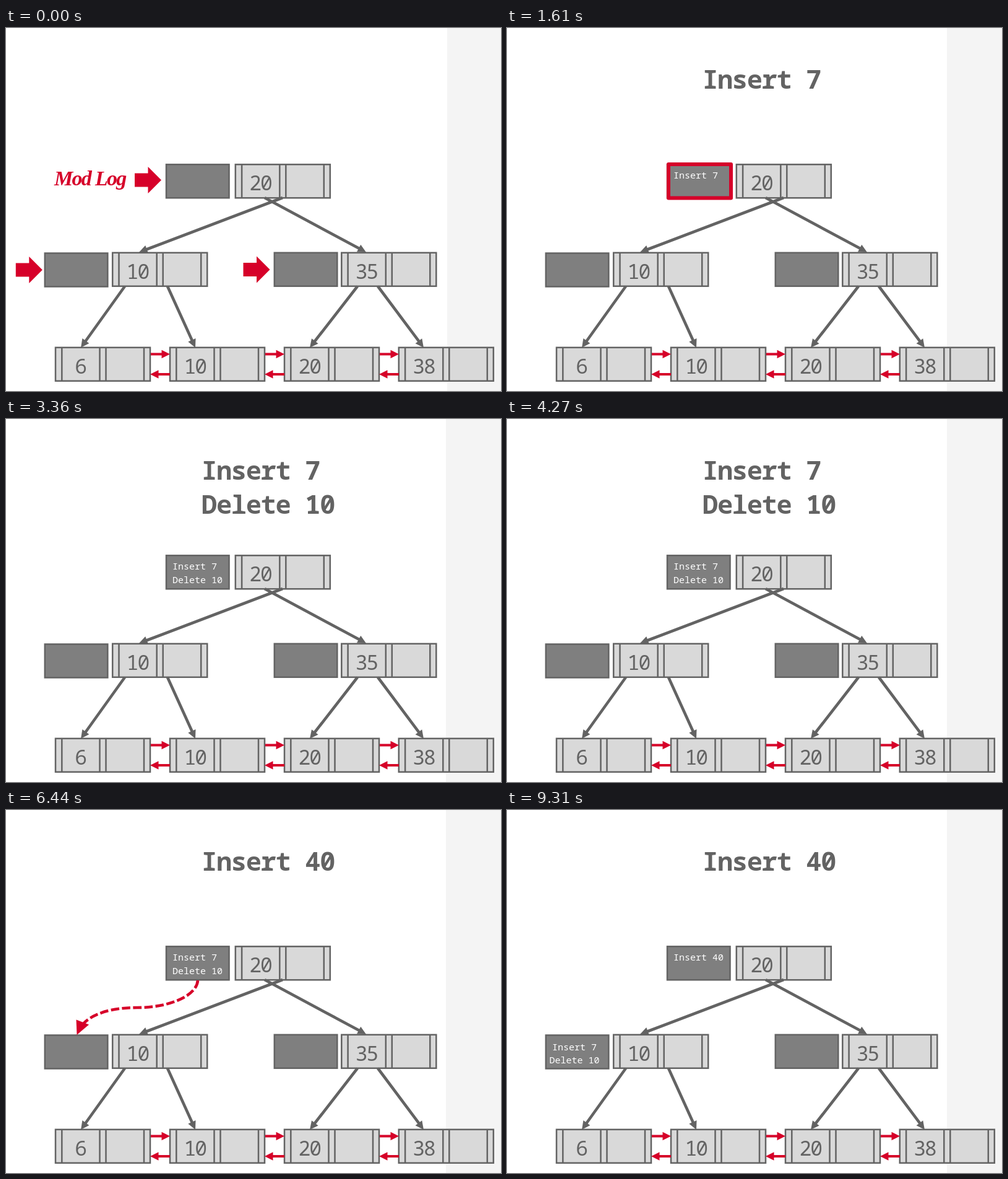
An HTML page that plays this animation: 800 px wide and 586 px high, repeating every 9.38 s.

```html
<!DOCTYPE html>
<html>
<head>
<meta charset="utf-8">
<style>
html, body { margin: 0; width: 100%; height: 100%; overflow: hidden; background: #fff; }
svg { display: block; }
text { font-family: "Noto Sans Mono", "DejaVu Sans Mono", monospace; white-space: pre; }
.title { font-size: 42px; font-weight: 600; letter-spacing: -1.3px; fill: #636363; }
.key { font-size: 33px; letter-spacing: -2px; fill: #636363; text-anchor: middle; }
.log { font-size: 15px; fill: #fff; }
.label { font: italic bold 34px "Liberation Serif", "Times New Roman", serif; letter-spacing: -1.7px; fill: #d60029; }
.edge { stroke: #636363; stroke-width: 4.6; }
.link { stroke: #d60029; stroke-width: 4; }
.frame { fill: none; stroke: #d60029; stroke-width: 6; stroke-linejoin: round; }
</style>
</head>
<body>
<svg width="800" height="586" viewBox="0 0 800 586"></svg>
<script>
const LOOP = 9380, GRAY = '#636363', RED = '#d60029';
const svg = document.querySelector('svg');

const text = (cls, x, y, s) => `<text class="${cls}" x="${x}" y="${y}">${s}</text>`;
const box = (x, y, w, fill) =>
  `<rect x="${x}" y="${y}" width="${w}" height="54" fill="${fill}" stroke="${GRAY}" stroke-width="2.5"/>`;
const node = (x, y, key) => box(x, y, 153, '#d9d9d9') +
  `<path d="${[10.3, 71.5, 81.5, 143].map(d => `M${x + d} ${y}v54`).join('')}" stroke="${GRAY}" stroke-width="2.5"/>` +
  text('key', x + 40.2, y + 42, key);
const logBox = (x, y) => box(x, y, 101.5, '#7f7f7f');

// Straight line that ends in a triangular head
function arrow(cls, color, x1, y1, x2, y2) {
  const angle = Math.atan2(y2 - y1, x2 - x1);
  const bx = x2 - 12 * Math.cos(angle), by = y2 - 12 * Math.sin(angle);
  return `<path class="${cls}" d="M${x1} ${y1}L${bx} ${by}"/>` +
    `<path fill="${color}" d="M0 0L-13.5 -6.7V6.7Z" transform="translate(${x2} ${y2}) rotate(${angle * 180 / Math.PI})"/>`;
}
const edge = (...p) => arrow('edge', GRAY, ...p);
const link = (...p) => arrow('link', RED, ...p);
const blockArrow = (x, y) =>
  `<path fill="${RED}" d="M${x} ${y + 10.5}h21.5v-10.5l21.5 21.5l-21.5 21.5v-10.5h-21.5z"/>`;
const frame = width => `<rect class="frame" x="261" y="220" width="${width}" height="54.5"/>`;
const during = (from, to, ...parts) => `<g data-from="${from}" data-to="${to}">${parts.join('')}</g>`;

const leaves = [[80, 6], [265, 10], [450, 20], [634.8, 38]];

svg.innerHTML = [
  '<rect x="711" width="89" height="586" fill="#f4f4f4"/>',
  during(0, 1610, '<rect x="710" width="3" height="586" fill="#fff"/>'),
  node(370.8, 220.3, 20), node(172.2, 362.8, 10), node(542.3, 362.8, 35),
  leaves.map(([x, key]) => node(x, 515.8, key)).join(''),
  logBox(259, 220.3), logBox(62.8, 363.5), logBox(433.8, 362.8),
  edge(447, 274, 215, 362), edge(418, 274, 582, 362),
  edge(192, 417, 121, 516), edge(261, 417, 306, 516),
  edge(568, 417, 491, 516), edge(601, 417, 675, 516),
  [234, 419, 604].map(x => link(x, 526.5, x + 31, 526.5) + link(x + 31, 559, x - 1, 559)).join(''),

  during(0, 1610, text('label', 78, 254, 'Mod Log'),
    blockArrow(208, 224), blockArrow(15.8, 369), blockArrow(383.5, 368.5)),

  during(1610, 4760, text('title', 316, 98, 'Insert 7')),
  during(3360, 4760, text('title', 316, 153, 'Delete 10')),
  during(4760, 6440, text('title', 316, 98, 'Find 10')),
  during(6440, LOOP, text('title', 316, 98, 'Insert 40')),

  during(1610, 3360, frame(101)),
  during(4760, 6440, frame(263)),

  during(1610, 8050, text('log', 269, 242.5, 'Insert 7')),
  during(3360, 8050, text('log', 269, 265, 'Delete 10')),
  during(8050, LOOP, text('log', 269, 242.5, 'Insert 40'),
    text('log', 73, 388, 'Insert 7'), text('log', 68.5, 409, 'Delete 10')),

  during(6440, 8050,
    `<path d="M310 275C308 301 262 319 212 319C168 319 139 330 125 345" fill="none" stroke="${RED}" stroke-width="4.6" stroke-dasharray="13.5 4.5"/>`,
    `<path d="M113.5 338.5L134 346.5L114.5 363Z" fill="${RED}"/>`)
].join('');

const timed = [...svg.querySelectorAll('[data-from]')];
const start = performance.now();

function draw() {
  const t = (performance.now() - start) % LOOP;
  for (const g of timed)
    g.style.display = t >= g.dataset.from && t < g.dataset.to ? '' : 'none';
  requestAnimationFrame(draw);
}
draw();
</script>
</body>
</html>
```
